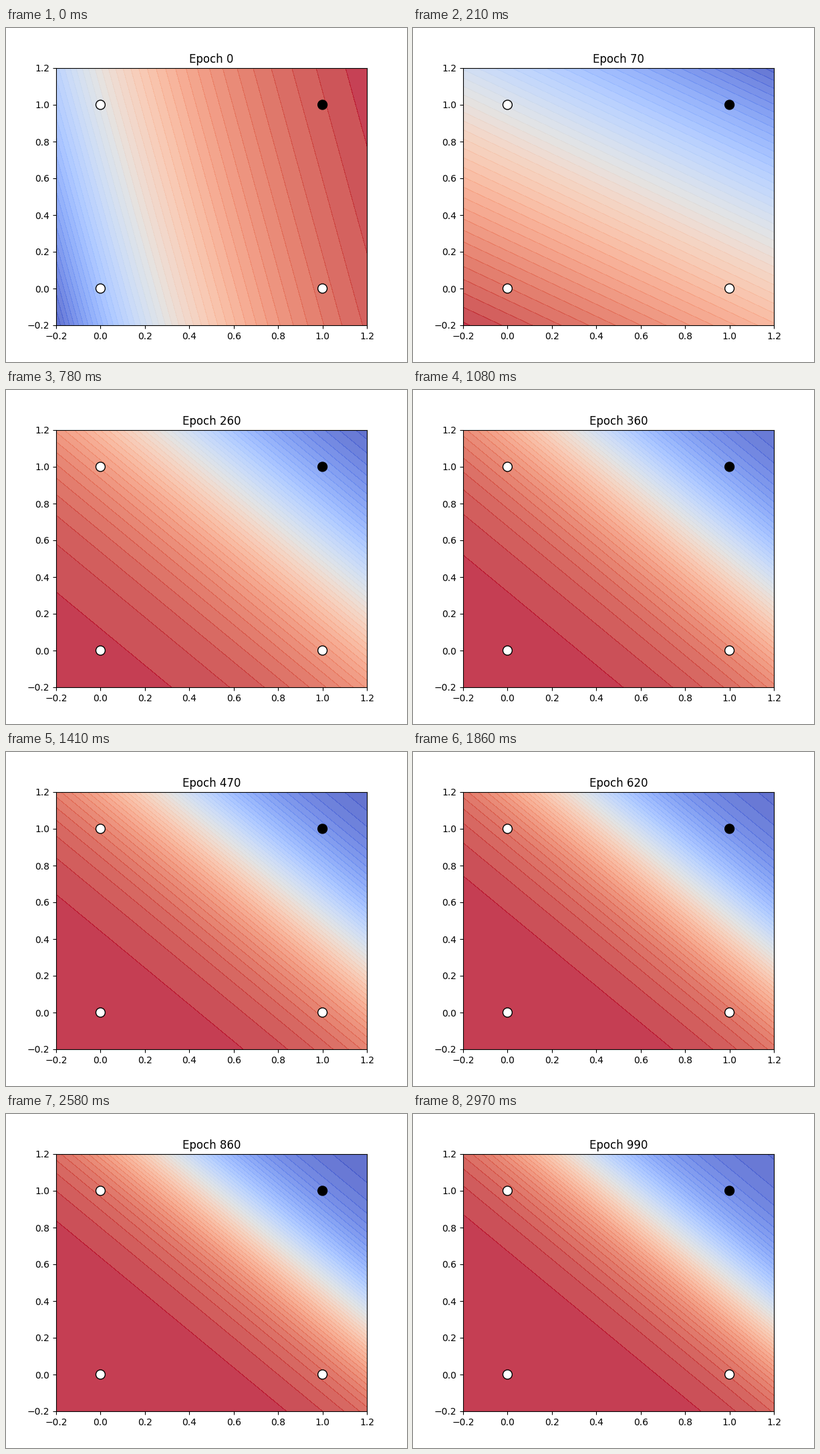
A matplotlib script that plays this animation: 600 by 500 pixels, repeating every 3 s.

```python
import numpy as np
import matplotlib.pyplot as plt
from matplotlib.animation import FuncAnimation

FRAMES, STRIDE, RATE = 100, 10, 0.5
LOW, HIGH = -0.2, 1.2

X = np.array([[0, 0], [0, 1], [1, 0], [1, 1]], float)
y = np.array([1.0, 1.0, 1.0, 0.0])  # NAND


def sigmoid(z):
    return 1 / (1 + np.exp(-z))


def train():
    """Gradient descent on squared error; keep every STRIDE-th state."""
    rng = np.random.RandomState(0)
    w, b = rng.randn(2), rng.randn()
    states = []
    for epoch in range(FRAMES * STRIDE):
        p = sigmoid(X @ w + b)
        delta = (y - p) * p * (1 - p)
        w = w + RATE * X.T @ delta
        b = b + RATE * delta.sum()
        if epoch % STRIDE == 0:
            states.append((w, b))
    return states


states = train()
axis = np.linspace(LOW, HIGH, 100)
xx, yy = np.meshgrid(axis, axis)

fig, ax = plt.subplots(figsize=(6, 5), dpi=100)


def draw(i):
    w, b = states[i]
    ax.clear()
    ax.contourf(xx, yy, sigmoid(w[0] * xx + w[1] * yy + b),
                levels=50, cmap="coolwarm", alpha=0.8)
    ax.scatter(X[:, 0], X[:, 1], c=y, cmap="gray", edgecolors="black", s=100)
    ax.set_xlim(LOW, HIGH)
    ax.set_ylim(LOW, HIGH)
    ax.set_title(f"Epoch {i * STRIDE}")
    return []


anim = FuncAnimation(fig, draw, frames=FRAMES, init_func=lambda: [],
                     interval=30, repeat=True, repeat_delay=0)
plt.show()
```
